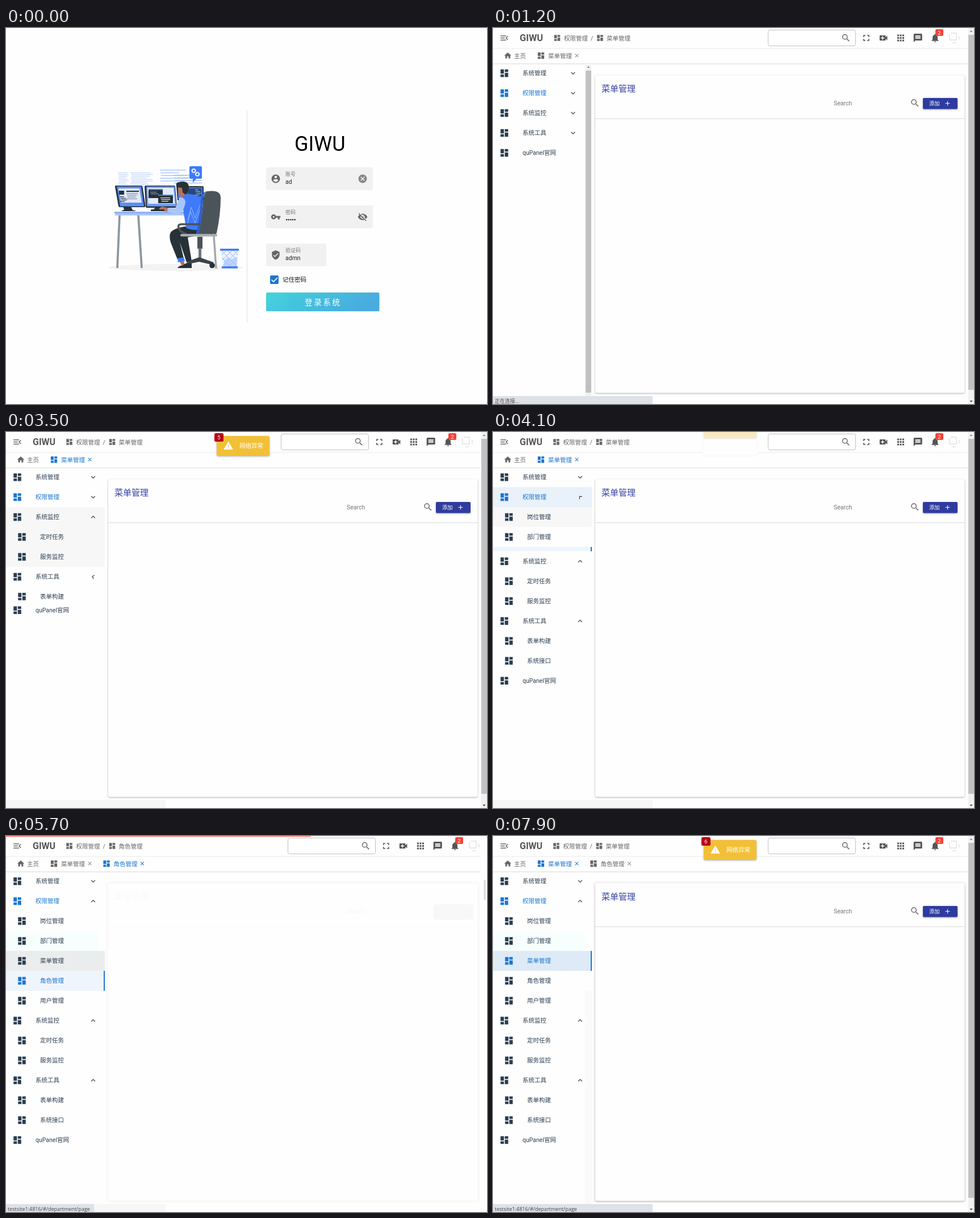
Recreate the animation shown at these times as an HTML page. Size 847 by 661 pixels, loop 8 s.

```html
<!DOCTYPE html>
<html lang="zh-CN">
<head>
<meta charset="utf-8">
<title>Admin console</title>
<style>
html, body { margin: 0; width: 100%; height: 100%; overflow: hidden; background: #fefefe; }
svg { display: block; }
text { font-family: Roboto, "Noto Sans CJK SC", "Noto Sans CJK", sans-serif; white-space: pre; }
.status { font-family: "Open Sans", "Noto Sans CJK SC", "Noto Sans CJK", sans-serif; }
.soft { filter: drop-shadow(0 1px 1.5px rgba(0,0,0,.32)); }
</style>
</head>
<body>
<svg id="stage" width="847" height="661" viewBox="0 0 847 661">
  <defs>
    <linearGradient id="btn" x1="0" y1="0" x2="1" y2=".25">
      <stop offset="0" stop-color="#3fd3db"/><stop offset="1" stop-color="#4aabdf"/>
    </linearGradient>
  </defs>
  <g id="login"></g>
  <g id="app"></g>
</svg>
<script>
const LOOP = 8000, STEP = 100;
const BLUE = '#1976d2', INK = '#2c3e50', GRAY = '#666';
const ICONS = {
  menu: 'M3 18h13v-2H3v2zm0-5h10v-2H3v2zm0-7v2h13V6H3zm18 9.59L17.42 12 21 8.41 19.59 7l-5 5 5 5L21 15.59z',
  dash: 'M3 13h8V3H3v10zm0 8h8v-6H3v6zm10 0h8V11h-8v10zm0-18v6h8V3h-8z',
  home: 'M10 20v-6h4v6h5v-8h3L12 3 2 12h3v8z',
  search: 'M15.5 14h-.79l-.28-.27A6.47 6.47 0 0 0 16 9.5 6.5 6.5 0 1 0 9.5 16c1.61 0 3.09-.59 4.23-1.57l.27.28v.79l5 4.99L20.49 19zm-6 0a4.5 4.5 0 1 1 0-9 4.5 4.5 0 0 1 0 9z',
  full: 'M7 14H5v5h5v-2H7v-3zm-2-4h2V7h3V5H5v5zm12 7h-3v2h5v-5h-2v3zM14 5v2h3v3h2V5h-5z',
  video: 'M17 10.5V7a1 1 0 0 0-1-1H4a1 1 0 0 0-1 1v10a1 1 0 0 0 1 1h12a1 1 0 0 0 1-1v-3.5l4 4v-11zM14 13h-3v3H9v-3H6v-2h3V8h2v3h3z',
  apps: [4, 10, 16].map(x => [4, 10, 16].map(y => `M${x} ${y}h4v4h-4z`).join('')).join(''),
  chat: 'M20 2H4a2 2 0 0 0-2 2v18l4-4h14a2 2 0 0 0 2-2V4a2 2 0 0 0-2-2zm-2 12H6v-2h12zm0-3H6V9h12zm0-3H6V6h12z',
  bell: 'M12 22a2 2 0 0 0 2-2h-4a2 2 0 0 0 2 2zm6-6v-5c0-3.07-1.64-5.64-4.5-6.32V4a1.5 1.5 0 0 0-3 0v.68C7.63 5.36 6 7.92 6 11v5l-2 2v1h16v-1z',
  user: 'M12 2a10 10 0 1 0 0 20 10 10 0 0 0 0-20zm0 3a3 3 0 1 1 0 6 3 3 0 0 1 0-6zm0 14.2c-2.5 0-4.71-1.28-6-3.22.03-1.99 4-3.08 6-3.08s5.97 1.09 6 3.08a7.2 7.2 0 0 1-6 3.22z',
  cancel: 'M12 2a10 10 0 1 0 0 20 10 10 0 0 0 0-20zm5 13.59L15.59 17 12 13.41 8.41 17 7 15.59 10.59 12 7 8.41 8.41 7 12 10.59 15.59 7 17 8.41 13.41 12z',
  key: 'M12.65 10a6 6 0 1 0 0 4H17v4h4v-4h2v-4zM7 14a2 2 0 1 1 0-4 2 2 0 0 1 0 4z',
  shield: 'M12 1L3 5v6c0 5.55 3.84 10.74 9 12 5.16-1.26 9-6.45 9-12V5zm-2 16l-4-4 1.41-1.41L10 14.17l6.59-6.59L18 9z',
  warn: 'M1 21h22L12 2zm12-3h-2v-2h2zm0-4h-2v-4h2z',
  down: 'M16.59 8.59L12 13.17 7.41 8.59 6 10l6 6 6-6z',
  close: 'M19 6.41L17.59 5 12 10.59 6.41 5 5 6.41 10.59 12 5 17.59 6.41 19 12 13.41 17.59 19 19 17.59 13.41 12z',
  add: 'M19 13h-6v6h-2v-6H5v-2h6V5h2v6h6z',
  hidden: 'M12 7a5 5 0 0 1 4.64 6.83l2.92 2.92A11.8 11.8 0 0 0 22.99 12C21.26 7.61 17 4.5 12 4.5c-1.4 0-2.74.25-3.98.7l2.16 2.16C10.74 7.13 11.35 7 12 7zM2 4.27l2.74 2.74A11.8 11.8 0 0 0 1 12c1.73 4.39 6 7.5 11 7.5 1.55 0 3.03-.3 4.38-.84L19.73 22 21 20.73 3.27 3zM7.53 9.8l1.55 1.55A3 3 0 0 0 12.65 14.92l1.55 1.55A5 5 0 0 1 7.53 9.8zm4.31-.78l3.15 3.15.02-.16a3 3 0 0 0-3-3z'
};

const icon = (name, x, y, s, fill = GRAY, rot = 0) =>
  `<path d="${ICONS[name]}" fill="${fill}" transform="translate(${x} ${y}) rotate(${rot}) scale(${s / 24}) translate(-12 -12)"/>`;
const rect = (x, y, w, h, fill, extra = '') =>
  `<rect x="${x}" y="${y}" width="${w}" height="${h}" fill="${fill}" ${extra}/>`;
const circle = (x, y, r, fill, extra = '') => `<circle cx="${x}" cy="${y}" r="${r}" fill="${fill}" ${extra}/>`;
const text = (s, x, y, size = 10.5, fill = GRAY, extra = '') =>
  `<text x="${x}" y="${y}" font-size="${size}" fill="${fill}" ${extra}>${s}</text>`;
const path = (d, fill, extra = '') => `<path d="${d}" fill="${fill}" ${extra}/>`;
const line = (d, color, w) => path(d, 'none', `stroke="${color}" stroke-width="${w}"`);
const group = (inner, extra) => `<g ${extra}>${inner}</g>`;
const clip = (x, y, w, h, inner) =>
  h > 0 ? `<svg x="${x}" y="${y}" width="${w}" height="${h}" viewBox="${x} ${y} ${w} ${h}">${inner}</svg>` : '';
const ramp = (t, a, b) => Math.min(1, Math.max(0, (t - a) / (b - a)));
const ease = (t, a, b) => 1 - (1 - ramp(t, a, b)) ** 1.45;
const within = (t, a, b) => t >= a && t < b;

// rows of short bars that read as lines of code
function codeRows(x, y, w, n, gap, color, h = 1.2) {
  let out = '';
  for (let i = 0; i < n; i++) {
    const len = w * (.65 + .35 * Math.abs(Math.sin(i * 2.3 + x)));
    out += rect(x + (i * 7 % 3), y + i * gap, len, h, color);
  }
  return out;
}

function drawScene() {
  const pale = '#c3d6fb', sky = '#a9c5fb', blue = '#3f7afc', dark = '#263238', steel = '#8f979c', skin = '#b9715b';
  let s = `<ellipse cx="299" cy="421" rx="119" ry="6" fill="#f3f3f3"/>`;
  s += codeRows(197, 254, 18, 8, 2.9, pale) + codeRows(219, 254, 39, 8, 2.9, pale);
  s += codeRows(271, 249, 50, 5, 4.8, sky, 1.5) + codeRows(296, 258, 50, 4, 4.6, sky, 1.5);
  // speech bubble
  s += rect(323, 243, 22, 22, blue, 'rx="2"') + path('M329 264h7l-7 8z', blue);
  for (const [x, y, r] of [[330.5, 251, 2.8], [337, 257, 2.8]])
    s += circle(x, y, r, 'none', 'stroke="#fff" stroke-width="1.6"') +
      circle(x, y, r + 1, 'none', 'stroke="#fff" stroke-dasharray="1.5 1.5"');
  // monitors
  s += path('M300 278h46q2 0 2 2v23h-46z', dark) + path('M303 280h43v20h-43z', blue) + path('M320 282h24v14h-24z', '#2c4878');
  s += codeRows(333, 284, 9, 4, 3, sky, 1);
  s += path('M206 314h14l3 6 7 2h-27l5-3z', dark);
  s += path('M193 277h45q2 0 2.5 2l5 34q0 2-2 2h-43q-2 0-2.5-2l-6-34q0-2 1-2z', dark);
  s += path('M195 278.5h43l5 35h-42z', '#5c8ff5') + path('M198 282h37l4 25h-36z', '#e1e8f8');
  s += rect(199, 286, 9, 7, dark) + rect(212, 286, 22, 2, dark) + codeRows(212, 290, 20, 4, 3.2, '#7f8ca0') + codeRows(201, 296, 10, 4, 2.8, dark);
  s += path('M263 315h18l4 7h-27z', dark);
  s += path('M246 277h50q2 0 2 2l3 35q0 2-2 2h-51q-2 0-2-2l-2-35q0-2 2-2z', dark);
  s += path('M247 278.5h50l3 35h-52z', '#6d9bf8') + path('M249 281h46l2.5 28h-47z', '#e3ebfc');
  s += rect(251, 283, 25, 16, dark) + rect(268, 293, 26, 15, dark) + rect(251, 283, 25, 2, blue) + rect(268, 293, 26, 2, blue);
  s += codeRows(272, 298, 17, 3, 3, '#dfe7f5') + codeRows(254, 288, 14, 2, 3, '#8796b0');
  // desk
  s += line('M200 329L196 422M233 329L239 422', steel, 3.8) + rect(191, 323, 157, 3, '#8db0f6') + rect(192, 326, 152, 3.5, sky);
  // rear chair leg
  s += line('M366 366L370 423', '#a3a9ad', 3.5) + line('M313 366L310 374', steel, 2);
  // person
  s += path('M339 347Q302 348 291 358 286 363 290 377L302 407 313 405 306 376 318 412 327 410 320 368 344 364z', dark);
  s += path('M302 405l11-2 2 7-12 2z', blue) + path('M306 411l7-1 2 6-6 1z', skin);
  s += path('M302 422q2-4 9-5l11-6 5 3v8z', dark);
  s += path('M303 299Q314 291 326 292 345 295 346 306L344 355Q324 356 317 351L312 320z', blue);
  s += line('M319 345l6-22 8 20 9-25M320 337l6-22 7 19 9-24', sky, .8);
  s += path('M306 297q13 2 9 14-4 16-13 17-9-3-20-5l2-7 14 1z', sky);
  s += path('M285 316l-11-2-5 4 6 4 9 1z', skin) + rect(255, 319, 24, 3, dark, 'rx="1"');
  s += path('M303 280h10l5 11-8 7-6-4z', skin);
  s += path('M300 278q-2-6 4-7 17-4 18 8 0 10-6 14l-5-4-1-8-8-1z', dark);
  // chair and its base
  s += path('M355 287Q378 284 378 298 378 328 371 360 369 366 361 366H338Q345 340 347 306 348 289 355 287z', '#4b5459');
  s += path('M355 287q-8 2-8 19-2 34-9 60h-4q7-32 9-62 2-17 12-17z', '#2f5fd0');
  s += line('M342 345H309Q302 345 304 351 306 359 318 362', '#4b5459', 3.5) + rect(307, 362, 65, 4.5, '#a7adb0', 'rx="2"');
  s += rect(337, 367, 9, 21, '#4b5459') + rect(339, 387, 5, 22, '#6d767b');
  s += path('M340 403l-19 7v5l19-4 22 5 4-4z', '#394247') + circle(363, 417.5, 4.8, dark) + circle(322, 418, 4, dark);
  // bin
  s += path('M379 391h30l-2 29h-26z', '#edf3ff');
  s += line('M380 392l26 26M390 391l17 17M400 391l8 8M380 403l15 16M408 392l-26 26M398 391l-17 17M388 391l-8 8M408 403l-15 16', '#8fb3fb', 1);
  s += path('M384 409l7-6 6 4 7-5 3 8-1 9h-23z', sky, 'opacity=".7"');
  return s + rect(377, 388, 33, 3.5, blue) + rect(380, 419, 28, 3.5, blue);
}

function field(y, w, name, label, value) {
  return rect(458, y, w, 40, '#f1f1f1', 'rx="3"') + icon(name, 475, y + 20, 18) +
    text(label, 492, y + 14.5, 9, '#777') + text(value, 492, y + 29, 10.5, '#222');
}

function drawLogin() {
  let s = drawScene() + rect(424, 144, 1, 374, '#e0e0e0');
  s += text('GIWU', 508, 215.5, 36, '#000');
  s += field(245, 188, 'user', '账号', 'ad') + icon('cancel', 628, 265, 18, '#888');
  s += field(312, 188, 'key', '密码', '') + icon('hidden', 628, 332, 18);
  for (let i = 0; i < 5; i++) s += circle(494.2 + i * 3.6, 337, 1.3, '#222');
  s += field(379, 106, 'shield', '验证码', 'admn');
  s += rect(465, 435, 15, 15, BLUE, 'rx="2"') + line('M467.5 442.5l3.500 3.5 7-7', '#fff', 1.7);
  s += text('记住密码', 487, 446, 10.5, '#111');
  return s + rect(458, 465, 199.5, 33, 'url(#btn)', 'rx="2"') + '<g id="ripple"></g>' +
    text('登录系统', 526, 486.5, 13.6, '#fff', 'letter-spacing="2.6"');
}

const stepUp = (t, from, gap, max) => Math.min(max, 1 + Math.max(0, Math.floor((t - from) / gap)));

function notice(dx, dy, alpha, count) {
  let s = rect(371, 7, 93, 35, '#f2c037', 'rx="3" class="soft"') + icon('warn', 391.5, 24, 18, '#fff') +
    text('网络异常', 411, 28, 10.5, '#fff');
  if (count > 1) s += rect(367, 2, 16, 15, '#b80018', 'rx="2.5"') + text(count, 375, 13, 9.5, '#fff', 'text-anchor="middle"');
  return group(s, `transform="translate(${dx} ${dy})" opacity="${alpha}"`);
}

function notices(t) {
  let s = '';
  if (within(t, 4000, 5300)) s += rect(367, -4, 100, 48, '#fbfbfb', 'rx="5"') + rect(371, 12, 93, 27, '#fefefe');
  if (within(t, 1500, 4300)) {
    const come = ease(t, 1400, 1700), go = ease(t, 3900, 4250);
    s += notice(0, -44 * (1 - come + go), come * (1 - go), stepUp(t, 1700, 130, 5));
  }
  if (t >= 6000) {
    const come = ease(t, 5900, 6200);
    s += notice(t < 6800 ? 6 : 0, -44 * (1 - come), come, stepUp(t, 6800, 110, 6));
  }
  return s;
}

function header(t, early, role) {
  const b = early ? 1.5 : 0, dx = role ? 12 : 0;
  const onMenu = !role && t >= 1500;
  let s = rect(0, 35.5, 836, 1, '#ececec') + rect(0, 62, 836, 1, '#e4e4e4') + rect(0, 63, 836, 2, '#f6f6f6');
  s += icon('menu', 20, 17.5, 18) + text('GIWU', 47, 23, early ? 16.4 : 16, '#555', 'font-weight="700"');
  s += icon('dash', 111.5 + b, 17.5, 14) + text('权限管理', 123.5 + b, 21.5) + text('/', 170.5 + b, 21.5);
  s += icon('dash', 187 + b, 17.5, 14) + text(role ? '角色管理' : '菜单管理', 198.5 + b, 21.5);
  s += icon('home', 26, 48.5, 15) + text('主页', 37, 52.5);
  const tab = (x, label, on) => icon('dash', x, 48.5, 15, on ? BLUE : GRAY) +
    text(label, x + 12.5, 52.5, 10.5, on ? BLUE : GRAY) + icon('close', x + 63, 48.5, 11, on ? BLUE : '#888');
  s += tab(84.5, '菜单管理', onMenu);
  if (t >= 5300) s += tab(177, '角色管理', role);
  let tools = rect(484.5, 3.5, 154, 28, '#fff', 'rx="3" stroke="#c0c0c0"') + icon('search', 621.5, 17.5, 18);
  ['full', 'video', 'apps', 'chat', 'bell'].forEach((n, i) => tools += icon(n, 657.3 + i * 30.3, 17.5, 18, '#555'));
  tools += rect(779, 2, 14, 12, '#f44336', 'rx="2.5"') + text('2', 786, 11.5, 9.5, '#fff', 'text-anchor="middle"');
  tools += line('M804 11v10h11M806 9h10v13M809 26h6M821 14v6', '#d4d4d4', 1);
  return s + group(tools, `transform="translate(${dx} 0)"`);
}

function card(alpha) {
  const s = rect(180, 83, 650.5, 558.5, '#fefefe', 'rx="3" class="soft"') + rect(180, 159, 650, 1, '#dcdcdc') +
    text('菜单管理', 191, 112, 15, '#3540a5') + text('Search', 600, 136, 10.5, '#757575') +
    icon('search', 743, 132, 18) + rect(757, 123, 61, 19.5, '#2f3c9f', 'rx="2" class="soft"') +
    text('添加', 768, 136, 9.3, '#fff', 'font-weight="500"') + icon('add', 800.5, 132.5, 13, '#fff');
  return group(s, `opacity="${alpha}"`);
}

// faint outline that stays while the card is away
const cardTrace = () => rect(178, 81.5, 654, 561, 'none', 'rx="4" stroke="#f9f9f9" stroke-width="4"') +
  rect(180, 159, 650, 1, '#fafafa') + rect(752, 120, 71, 27, '#f8f8f8', 'rx="5"') +
  text('菜单管理', 191, 112, 15, '#f8f8f8') + text('Search', 600, 136, 10.5, '#f6f6f6');

function sidebar(t, early, role) {
  const perm = ease(t, 4000, 4300), mon = ease(t, 2400, 3100), tool = ease(t, 3400, 3800);
  const cx = early ? 141 : 153.5;
  const row = (label, y, sub, color = INK) => icon('dash', sub ? 28 : 20, y, 18, color) + text(label, sub ? 60 : 52, y + 3.5, 10.5, color);
  const parent = (label, y, open, color) => row(label, y, false, color) + icon('down', cx, y, 15, '#444', 180 * Math.min(1, open * 1.7));
  const subs = (names, y, open, paint = () => '') => clip(0, y + 17.5, 174, 35 * names.length * open,
    names.map((n, i) => paint(i, y + 17.5 + 35 * i) + row(n, y + 35 * (i + 1), true, paint.active === i ? BLUE : INK)).join(''));

  let s = '';
  if (within(t, 1900, 3600)) s += rect(0, 132, 174, 105, '#f7f7f7');
  if (within(t, 3700, 4300)) s += rect(0, 97, 174, 35, '#e9f1fa');
  const rowFill = i => {
    if (i === 0 && t < 4300) return '#f7f7f7';
    if (i === 1 && t >= 4300) return '#f6fffd';
    if (i === 2) return role ? (t >= 5700 ? '#ebeced' : '') : t >= 6800 ? '#deeaf6' : '#eff5fc';
    if (i === 3) return role ? '#eff5fc' : within(t, 5000, 5300) ? '#ebeced' : '';
    return '';
  };
  const active = role ? 3 : 2;
  const paint = (i, y) => (rowFill(i) ? rect(0, y, i === 1 ? 162 : 174, 35, rowFill(i)) : '') +
    (i === active ? rect(172, y, 2, 35, BLUE) : '');
  paint.active = active;

  const yMon = 149.5 + 175 * perm, yTool = yMon + 35 + 70 * mon, yLink = yTool + 35 + 70 * tool;
  if (t >= 5800) s += rect(162, role ? 64 : 272, 12, role ? 583 : 375, '#fafafa');
  s += parent('系统管理', 79.5, 0) + parent('权限管理', 114.5, perm, BLUE);
  s += subs(['岗位管理', '部门管理', '菜单管理', '角色管理', '用户管理'], 114.5, perm, paint);
  s += parent('系统监控', yMon, mon) + subs(['定时任务', '服务监控'], yMon, mon);
  s += parent('系统工具', yTool, tool) + subs(['表单构建', '系统接口'], yTool, tool);
  s += row('quPanel官网', yLink);
  if (early) s += rect(163, 63, 10, 584, '#f1f1f1') + rect(163, 75, 10, 566, '#c1c1c1') + path('M165.5 70l2.5-3 2.5 3z', '#888');
  return s;
}

function status(t) {
  if (t < 1500) return rect(0, 647, 281, 14, '#dee1e6') + text('正在连接...', 3, 658.5, 9, '#444', 'class="status"');
  let s = rect(0, 647, 281, 14, '#f7f7f7');
  if (t < 5200) return s;
  s += rect(0, 647, t < 6800 ? 155 : 281, 14, '#dee1e6');
  const page = t < 5700 ? 'role' : 'page';
  return s + text('testsite1:4816/#/department/' + page, 3, 658.5, 9, '#444', 'class="status"');
}

function progress(t, role) {
  let w = 0;
  if (within(t, 1300, 2300)) w = 836 * ease(t, 1200, 2200);
  if (within(t, 5200, 7900)) w = (role ? 847 : 836) * ease(t, 5100, 6300);
  return w ? rect(0, 0, w, 1, '#f4483c') : '';
}

function drawApp(t) {
  const early = t < 1500, role = within(t, 5300, 6800);
  const alpha = t < 5300 ? ramp(t, 900, 1200) : t < 6800 ? 1 - ramp(t, 5200, 5700) : ramp(t, 6700, 7200);
  let s = rect(0, 0, 847, 661, '#fefefe') + (t >= 5300 ? cardTrace() : '') + card(alpha) +
    sidebar(t, early, role) + header(t, early, role);
  if (role) s += rect(841, 77, 4, 36, '#e0e0e0', 'rx="2"');
  else s += rect(837, 0, 10, 661, '#f1f1f1') + rect(837, 12, 10, 624, '#c1c1c1') +
    path('M839.5 7l2.5-3 2.5 3z', '#888') + path('M839.5 655l2.5 3 2.5-3z', '#444');
  return s + notices(t) + status(t) + progress(t, role);
}

const login = document.getElementById('login'), app = document.getElementById('app');
login.innerHTML = drawLogin();
const ripple = document.getElementById('ripple');
let last = -1;

function update(t) {
  const isLogin = t < 1000;
  login.style.display = isLogin ? '' : 'none';
  app.style.display = isLogin ? 'none' : '';
  if (isLogin) {
    const k = ramp(t, -100, 700);
    ripple.innerHTML = clip(458, 465, 199.5, 33, circle(472, 481, 200 * k, '#fff', `opacity="${.2 * k * (1 - k)}"`));
  } else app.innerHTML = drawApp(t);
}

const start = performance.now();
function tick() {
  const t = Math.floor((performance.now() - start) % LOOP / STEP) * STEP;
  if (t !== last) update(last = t);
  requestAnimationFrame(tick);
}
tick();
</script>
</body>
</html>
```
